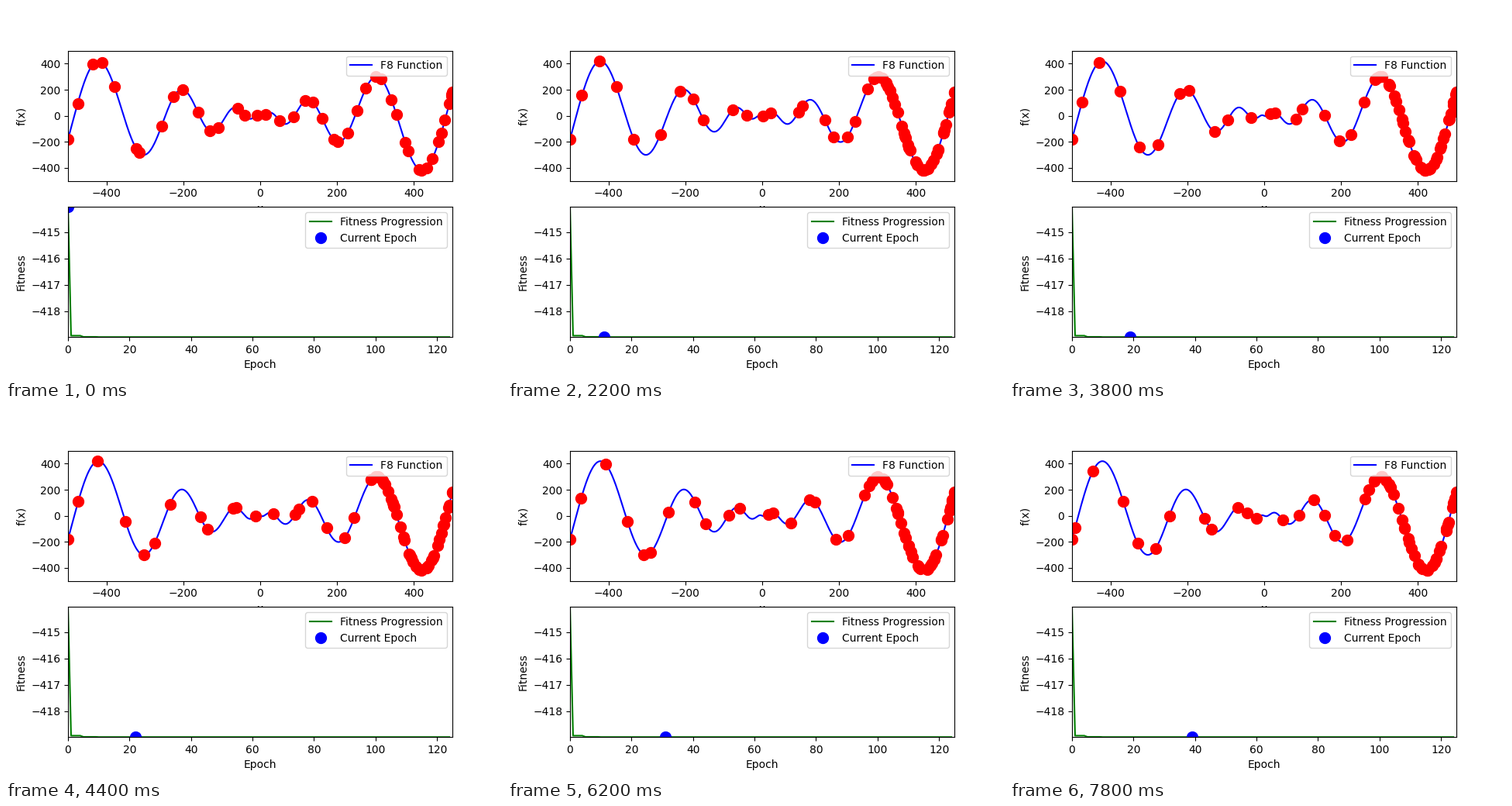
These frames come from a looping animation (640 by 480 pixels, 8000 ms). A matplotlib script:

```python
import numpy as np
import matplotlib.pyplot as plt
from matplotlib.animation import FuncAnimation

FRAMES, INTERVAL = 40, 200
EPOCHS = 125
LIMIT = 500


def f8(x):
    return -x * np.sin(np.sqrt(np.abs(x)))


def population(epoch):
    """Scattered individuals plus a crowd that gathers in the deepest valley."""
    rng = np.random.default_rng(80 + epoch)
    settled = 1 - np.exp(-epoch / 3)

    # One random pick per stratum, thinning out towards the left edge
    count = round(42 - 12 * settled)
    u = (np.arange(count) + rng.random(count)) / count
    strays = LIMIT - 2 * LIMIT * u ** 1.6

    size = round(28 * settled)
    crowd = np.linspace(285, 495, size) + rng.normal(0, 4, size)

    xs = np.concatenate([strays, crowd, [-LIMIT, LIMIT]])
    return np.clip(xs, -LIMIT, LIMIT)


# Best value drops in three steps, then stays flat
fitness = np.full(EPOCHS, -418.983)
fitness[:10] = -418.975
fitness[:5] = -418.93
fitness[0] = -414.043

fig, (top, low) = plt.subplots(2, 1, figsize=(6.4, 4.8), dpi=100)

x = np.linspace(-LIMIT, LIMIT, 1000)
top.plot(x, f8(x), "b-", label="F8 Function")
dots, = top.plot([], [], "ro", markersize=10)
top.set(xlim=(-LIMIT, LIMIT), ylim=(-LIMIT, LIMIT), xlabel="x", ylabel="f(x)")
top.legend(loc="upper right")

low.plot(np.arange(EPOCHS), fitness, "g-", label="Fitness Progression")
current, = low.plot([], [], "bo", markersize=10, label="Current Epoch")
low.set(xlim=(0, EPOCHS), ylim=(fitness.min(), fitness.max()),
        xlabel="Epoch", ylabel="Fitness")
low.legend(loc="upper right")


def update(epoch):
    xs = population(epoch)
    dots.set_data(xs, f8(xs))
    current.set_data([epoch], [fitness[epoch]])
    return dots, current


anim = FuncAnimation(fig, update, frames=FRAMES, interval=INTERVAL,
                     repeat=True, repeat_delay=0)
plt.show()
```
